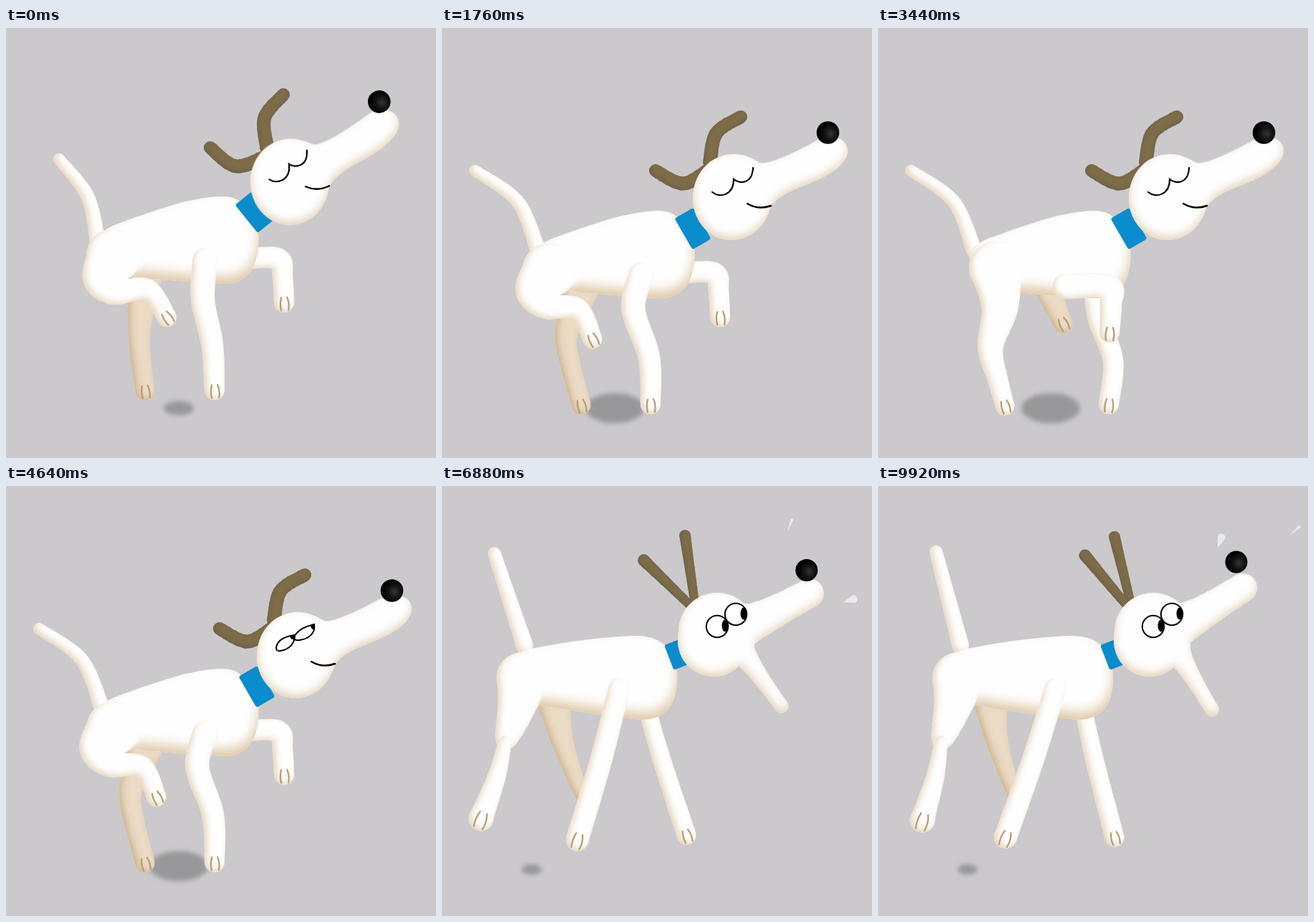
An HTML page for the animation above (9.96 s loop, 600 by 600 pixels).

```html
<!DOCTYPE html>
<html lang="en">
<head>
<meta charset="utf-8">
<title>Prancing dog</title>
<style>
html, body { margin: 0; width: 100%; height: 100%; overflow: hidden; background: #cbc9cb; }
svg { display: block; width: 100vw; height: 100vh; }
</style>
</head>
<body>
<svg id="stage" viewBox="0 0 600 600">
  <defs>
    <radialGradient id="noseFill" cx=".62" cy=".55" r=".5">
      <stop offset="0" stop-color="#363636"/>
      <stop offset=".5" stop-color="#151515"/>
      <stop offset="1" stop-color="#000"/>
    </radialGradient>
    <filter id="soft" x="-50%" y="-50%" width="200%" height="200%"><feGaussianBlur stdDeviation="3"/></filter>
    <filter id="blend" x="-50%" y="-50%" width="200%" height="200%"><feGaussianBlur stdDeviation="5"/></filter>
  </defs>
</svg>
<script>
const LOOP = 9960, HOP = 240, FIRST_LOW = 1760;
const EYES_OPEN = 4400, SQUAT = 5120, LEAP = 5280;
const WHITE = '#fefefe', FAR = '#ebdac4', EAR = '#7f6c48', BLUE = '#0b8ccc';
const svg = document.getElementById('stage');

function add(parent, tag, attrs = {}) {
  const el = document.createElementNS('http://www.w3.org/2000/svg', tag);
  set(el, attrs);
  parent.appendChild(el);
  return el;
}
function set(el, attrs) {
  for (const k in attrs) el.setAttribute(k, attrs[k]);
}

// Inner shading: the part of the shape not covered by its own shifted, blurred copy
function shading(id, color, dx, dy, blur) {
  const f = add(svg.querySelector('defs'), 'filter', { id, 'color-interpolation-filters': 'sRGB' });
  add(f, 'feOffset', { in: 'SourceAlpha', dx, dy });
  add(f, 'feGaussianBlur', { stdDeviation: blur, result: 'core' });
  add(f, 'feFlood', { 'flood-color': color });
  add(f, 'feComposite', { in2: 'core', operator: 'out' });
  add(f, 'feComposite', { in2: 'SourceAlpha', operator: 'in', result: 'rim' });
  const m = add(f, 'feMerge');
  add(m, 'feMergeNode', { in: 'SourceGraphic' });
  add(m, 'feMergeNode', { in: 'rim' });
}
shading('limbShade', '#e6d5bd', 4, -3, 4);
shading('bodyShade', '#dfc9a8', 0, -10, 8);
shading('headShade', '#e4d2b8', 1, -5, 6);
shading('farShade', '#cdb48f', 4, -2, 5);
shading('earShade', '#66604e', 1, -2, 3);

const clamp = x => Math.min(1, Math.max(0, x));
const ease = x => { x = clamp(x); return x * x * (3 - 2 * x); };
const mix = (a, b, k) => Array.isArray(a) ? a.map((v, i) => mix(v, b[i], k)) : a + (b - a) * k;
const mod = (a, n) => ((a % n) + n) % n;
const fix = n => n.toFixed(2);
const show = (el, on) => el.setAttribute('display', on ? 'inline' : 'none');
const shift = (pts, dx, dy) => pts.map(([x, y]) => [x + dx, y + dy]);

// Turn a chain of points about its first point (or a given pivot)
function spin(pts, deg, [cx, cy] = pts[0]) {
  const c = Math.cos(deg * Math.PI / 180), s = Math.sin(deg * Math.PI / 180);
  return pts.map(([x, y]) => [cx + (x - cx) * c - (y - cy) * s, cy + (x - cx) * s + (y - cy) * c]);
}
// Pull a chain of points towards the straight line between its ends
function straighten(pts, k) {
  const n = pts.length - 1;
  return pts.map((p, i) => mix(p, mix(pts[0], pts[n], i / n), k));
}
// Three points from root to tip, bowed sideways by a share of the length
function bow([x, y], [tx, ty], bend) {
  return [[x, y], [(x + tx) / 2 + (ty - y) * bend, (y + ty) / 2 - (tx - x) * bend], [tx, ty]];
}

// Tapered tube along a smooth curve, as a union of discs
function tube(pts, r0, r1, power = 1) {
  const last = pts.length - 1;
  let d = '';
  for (let i = 0; i < last; i++) {
    const p = pts[Math.max(0, i - 1)], q = pts[i], e = pts[i + 1], s = pts[Math.min(last, i + 2)];
    const n = Math.ceil(Math.hypot(e[0] - q[0], e[1] - q[1]) / 3);
    for (let j = 0; j <= n; j++) {
      const t = j / n;
      const [x, y] = [0, 1].map(c => q[c] + t / 2 * (e[c] - p[c]
        + t * (2 * p[c] - 5 * q[c] + 4 * e[c] - s[c] + t * (3 * (q[c] - e[c]) + s[c] - p[c]))));
      const r = r1 + (r0 - r1) * (1 - (i + t) / last) ** power;
      d += `M${fix(x - r)} ${fix(y)}a${fix(r)} ${fix(r)} 0 1 0 ${fix(2 * r)} 0a${fix(r)} ${fix(r)} 0 1 0 ${fix(-2 * r)} 0`;
    }
  }
  return d;
}

function claws(pts, r) {
  const [[px, py], [x, y]] = pts.slice(-2);
  const len = Math.hypot(x - px, y - py), ux = (x - px) / len, uy = (y - py) / len;
  const at = (a, b) => `${fix(x + r * (ux * a - uy * b))} ${fix(y + r * (uy * a + ux * b))}`;
  return [-.4, .32].map(b => `M${at(-.5, b * .8)}Q${at(.1, b * 1.4)} ${at(.78, b)}`).join('');
}

const part = (g, fill, filter, d = '') => add(g, 'path', { fill, d, filter: `url(#${filter})` });
const line = (g, d, w, stroke = '#000') =>
  add(g, 'path', { d, fill: 'none', stroke, 'stroke-width': w, 'stroke-linecap': 'round' });
const collar = (g, w, h) => add(g, 'rect', { x: -w / 2, y: -h / 2, width: w, height: h, rx: 3, fill: BLUE });

// Returns a function that poses the limb; a joint blends its root into the body
function limb(g, r0, r1, { power = 1, paw = false, joint = 0, fill = WHITE, shade = 'limbShade' } = {}) {
  const skin = part(g, fill, shade);
  const toes = paw && line(g, '', 2.3, '#b99d73');
  const root = joint && add(g, 'circle', { r: r0 * .8, fill: WHITE, filter: 'url(#blend)' });
  return pts => {
    skin.setAttribute('d', tube(pts, r0, r1, power));
    if (paw) toes.setAttribute('d', claws(pts, r1));
    if (joint) set(root, { cx: pts[0][0] + joint, cy: pts[0][1] - 4 });
  };
}
const farSkin = { fill: FAR, shade: 'farShade' }, earSkin = { fill: EAR, shade: 'earShade' };

const shadow = add(svg, 'ellipse', { fill: '#98979a', filter: 'url(#soft)' });
const setShadow = (cx, cy, rx, ry) => set(shadow, { cx, cy, rx, ry });

// ---------- prancing dog ----------
const walk = add(svg, 'g');
const wTail = limb(walk, 11, 8);
// Each leg: stance a, stance b, and how far it swings in the air
const legs = [
  { a: [[195, 365], [178, 410], [174, 445], [194, 526]], b: [[232, 345], [240, 370], [249, 392], [258, 412]], stretch: .6,
    pose: limb(walk, 24, 13.5, { power: 2, paw: true, ...farSkin }) },
  { a: [[330, 342], [380, 342], [386, 368], [388, 403]], b: [[303, 372], [308, 408], [328, 464], [322, 525]],
    pose: limb(walk, 15, 14, { paw: true }) }
];
const wBody = part(walk, WHITE, 'bodyShade', 'M128 322C127 304 146 296 170 288C210 274 262 255 302 255C326 255 338 268 352 304C355 340 345 377 305 377C270 376 230 372 195 369C150 362 128 345 128 322Z');
legs.push(
  { a: [[150, 338], [128, 366], [145, 388], [190, 392], [210, 434]], b: [[165, 335], [170, 390], [157, 445], [167, 490], [177, 527]], swing: -9,
    pose: limb(walk, 38, 13.5, { power: 2.5, paw: true, joint: 14 }) },
  { a: [[278, 345], [267, 392], [289, 460], [291, 525]], b: [[262, 360], [322, 361], [325, 385], [323, 425]], stretch: .5,
    pose: limb(walk, 18, 14, { paw: true, joint: 2 }) }
);
const wEarL = limb(walk, 10, 9, earSkin), wEarR = limb(walk, 10, 9, earSkin);
const wCollar = collar(walk, 30, 50);
const wHead = add(walk, 'g');
part(wHead, WHITE, 'headShade', 'M404 176C420 175 432 181 444 188C456 192 500 170 528 154C550 146 568 158 566 174C562 196 530 211 500 222C482 229 466 238 459 249C452 275 432 296 404 296C372 296 350 268 350 238C350 205 372 178 404 176Z');
const wNose = add(wHead, 'circle', { r: 15.8, fill: 'url(#noseFill)' });
line(wHead, 'M426 245C436 251 448 252 459 248', 2.4);
const shut = line(wHead, 'M377 229C388 238 407 233 407 211C415 218 433 218 434 195', 2.2);
const half = add(wHead, 'g');
line(half, 'M377 226C378 215 389 210 403 208C403 219 396 228 383 230Q377 231 377 226Z', 2);
line(half, 'M401 212C407 200 418 196 430 193C432 204 424 213 410 215Q403 216 401 212Z', 2);
add(half, 'path', { d: 'M396 209L404 207L402 214Q397 215 396 209ZM425 194L431 192L431 201Q425 200 425 194Z' });

function drawWalk(t) {
  const since = t - FIRST_LOW, phase = mod(since, HOP), beat = mod(Math.floor(since / HOP), 4);
  const squat = t < SQUAT ? 0 : ease((t - SQUAT + 40) / 120);
  // Height of the hop; two hops on each stance
  const u = t < SQUAT ? clamp(.5 - .58 * Math.cos((phase - 20) / HOP * 2 * Math.PI)) : 0;
  const swap = ease((phase - 50) / 150);
  const w = t < SQUAT ? [0, swap, 1, 1 - swap][beat] : 0;
  const dy = -20 * u;

  set(walk, { transform: `translate(${-10 * squat} ${6 * squat})` });
  for (const { a, b, stretch = 0, swing = 0, pose } of legs) {
    const air = spin(straighten(a, stretch * u), swing * u);
    pose(shift(mix(air, b, w), 0, dy));
  }
  set(wBody, { transform: `translate(0 ${dy})` });
  wTail(bow(mix([134, 310], [128, 298], u), mix([46, 199], [74, 183], u), -.14 + .03 * u));
  wEarL(bow(mix([374, 197], [362, 180], u), mix([298, 199], [285, 167], u), .25));
  wEarR(bow(mix([374, 186], [364, 166], u), mix([417, 124], [387, 93], u), .2));
  set(wCollar, { transform: `translate(${350 - 3 * u} ${280 - 23 * u}) rotate(${-30 - 9 * u})` });
  set(wHead, { transform: `translate(${-9 * u} ${-21 * u}) rotate(${-7 * u} 404 236)` });
  set(wNose, { cx: 538.5 + 4 * u, cy: 146 - 6 * u });
  show(shut, t < EYES_OPEN);
  show(half, t >= EYES_OPEN);
  setShadow(241, 530.5, 41 - 20 * u + 6 * squat, 21 - 11 * u + 5 * squat);
}

// ---------- barking dog ----------
const bark = add(svg, 'g');
// Each part: key points and how far it shakes about its root
const shaking = [
  { pts: [[115, 222], [81, 92]], turn: -3.5, pose: limb(bark, 12, 9) },
  { pts: [[158, 310], [166, 355], [190, 432]], turn: -2, pose: limb(bark, 22, 9, farSkin) },
  { pts: [[288, 318], [303, 385], [330, 490]], turn: -3.7, pose: limb(bark, 12, 13.5, { paw: true }) }
];
part(bark, WHITE, 'bodyShade', 'M80 285C80 250 95 232 130 226C180 216 230 210 270 209C302 209 328 224 328 268C328 305 312 327 278 326C240 322 180 314 138 306C100 300 80 300 80 285Z');
shaking.push(
  { pts: [[112, 268], [105, 305], [88, 358]], turn: 0, pose: limb(bark, 36, 9, { power: .6, joint: 14 }) },
  { pts: [[88, 357], [80, 405], [62, 466]], turn: 4, pose: limb(bark, 9, 17.5, { power: .8, paw: true }) },
  { pts: [[247, 283], [217, 380], [178, 490]], turn: -3, pose: limb(bark, 15, 16, { paw: true, joint: 2 }) },
  { pts: [[350, 170], [289, 97]], turn: -6, pose: limb(bark, 6, 8.5, earSkin) },
  { pts: [[353, 165], [330, 71]], turn: 5.5, pose: limb(bark, 6, 8, earSkin) }
);
collar(bark, 22, 37).setAttribute('transform', 'translate(327 235.5) rotate(-21)');
const skull = [[384, 203], [379, 216]], muzzle = [[400, 200], [440, 184], [509, 142]], jaw = [[412, 222], [466, 312]];
const bHead = part(bark, WHITE, 'headShade');
const bNose = add(bark, 'circle', { r: 15.5, fill: 'url(#noseFill)' });
for (const [x, y] of [[384, 196], [410, 179]]) {
  add(bark, 'circle', { cx: x, cy: y, r: 15.2, fill: '#fff', stroke: '#000', 'stroke-width': 2 });
  add(bark, 'ellipse', { cx: x + 11, cy: y - 1, rx: 4.5, ry: 8.5 });
}

const spray = add(svg, 'path', { fill: '#e9e9ea' });
// Drops leave three places in turn, then shoot off and thin out
const springs = [{ x: 474, y: 86, a: -70 }, { x: 560, y: 162, a: -16 }, { x: 557, y: 84, a: -41 }];
function drop({ x, y, a }, i, step) {
  const age = mod(step - i, 3);
  if (age > 1) return '';
  const r = 5.5 - 3.5 * age, from = 22 * age, to = from + 15 + 4 * age;
  const [tip, l, e] = spin([[x + from, y], [x + to, y - r], [x + to, y + r]], a, [x, y]);
  return `M${tip}L${l}A${r} ${r} 0 0 1 ${e}Z`;
}

function drawBark(t) {
  const step = Math.floor(t / 80 + 2) % 3;
  const k = [0, 1, .5][step];
  for (const { pts, turn, pose } of shaking) pose(spin(pts, turn * k));
  bHead.setAttribute('d', tube(skull, 54, 50) + tube(spin(muzzle, 4 * k), 40, 20, 2) + tube(spin(jaw, -5 * k), 24, 10, 3));
  const [[cx, cy]] = spin([[500, 106]], 5.5 * k, skull[0]);
  set(bNose, { cx, cy });

  // Leap back, overshoot and settle
  const s = t - LEAP, go = ease((s + 40) / 160), back = 1 - ease((s - 160) / 240);
  set(bark, { transform: `translate(${fix(mix(60, -26, go) * back)} ${fix(mix(30, -14, go) * back)})` });
  setShadow(mix(200, 125, go), 535, mix(34, 14, go), mix(17, 7.5, go));
  spray.setAttribute('d', springs.map((p, i) => drop(p, i, step)).join(''));
  show(spray, s >= 320);
}

function draw(t) {
  const barking = t >= LEAP;
  show(walk, !barking);
  show(bark, barking);
  show(spray, false);
  (barking ? drawBark : drawWalk)(t);
}

let last = -1;
const start = performance.now();
function tick(now) {
  const t = Math.floor(Math.max(0, now - start) % LOOP / 40) * 40;
  if (t !== last) draw(last = t);
  requestAnimationFrame(tick);
}
draw(0);
requestAnimationFrame(tick);
</script>
</body>
</html>
```
